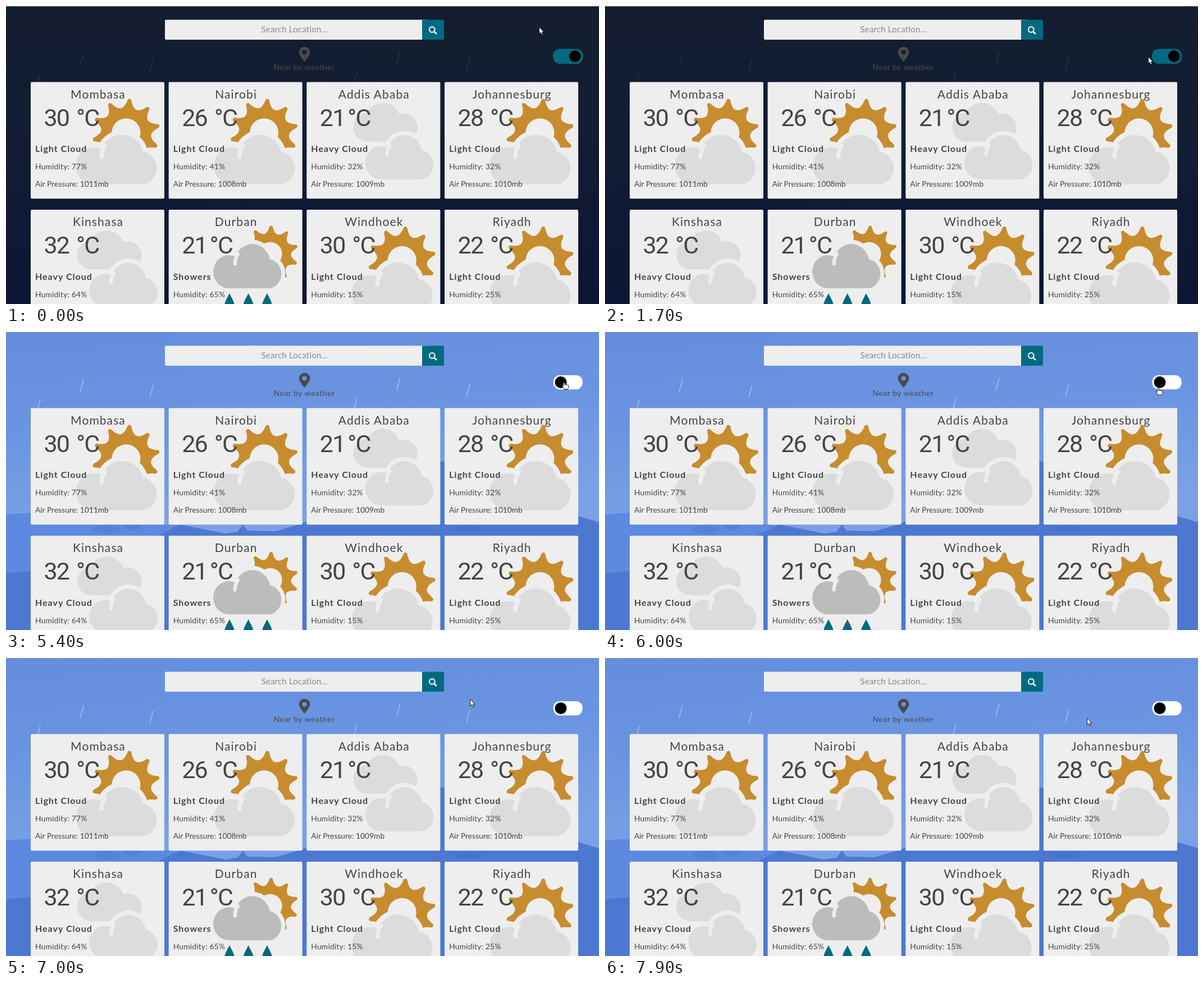
Write an HTML page that moves like this. It is 1056x531 px and loops after 8 s.

```html
<!DOCTYPE html>
<html lang="en">
<head>
<meta charset="utf-8">
<title>Weather</title>
<style>
html, body { margin: 0; width: 100%; height: 100%; overflow: hidden; background: #0d1634; }
svg { display: block; width: 1056px; height: 531px; }
text { font-family: Lato, "Open Sans", sans-serif; fill: #444; }
.title { font-size: 21px; letter-spacing: 1.1px; text-anchor: middle; }
.temp { font: 43px Roboto, "Open Sans", sans-serif; letter-spacing: -1.8px; }
.state { font-size: 16px; font-weight: 700; letter-spacing: 1px; }
.hum { font-size: 13.8px; letter-spacing: .2px; }
.air { font-size: 13.8px; }
.hint { font-size: 15px; letter-spacing: .2px; fill: #8a8a8a; }
.near { font-size: 14px; letter-spacing: .5px; fill: #4a4a4a; }

.night, .rain, .cursor, .arrow, .hand { animation: 8s step-end -4ms infinite; }
.night { animation-name: night; }
.rain { animation-name: rain; }
.cursor { animation-name: move; }
.arrow { animation-name: arrow; }
.hand { animation-name: hand; }
@keyframes night { 0% { opacity: 1 } 67.5%, 100% { opacity: 0 } }
@keyframes rain { 0% { opacity: .14 } 67.5%, 100% { opacity: .8 } }
@keyframes arrow { 0% { opacity: 1 } 28.75% { opacity: 0 } 77.5%, 100% { opacity: 1 } }
@keyframes hand { 0% { opacity: 0 } 28.75% { opacity: 1 } 77.5%, 100% { opacity: 0 } }
@keyframes move {
  0% { transform: translate(949px, 37px) }
  15% { transform: translate(950px, 40px) }
  16.25% { transform: translate(952px, 47px) }
  17.5% { transform: translate(954px, 56px) }
  18.75% { transform: translate(957px, 66px) }
  20% { transform: translate(961px, 78px) }
  21.25% { transform: translate(967px, 90px) }
  22.5% { transform: translate(978px, 107px) }
  23.75% { transform: translate(987px, 119px) }
  26.25% { transform: translate(987px, 117px) }
  27.5% { transform: translate(989px, 109px) }
  28.75% { transform: translate(988px, 98px) }
  30% { transform: translate(988px, 92px) }
  67.5% { transform: translate(990px, 89.5px) }
  75% { transform: translate(981px, 100px) }
  77.5% { transform: translate(955px, 112px) }
  78.75% { transform: translate(925px, 112px) }
  80% { transform: translate(899px, 110.5px) }
  81.25% { transform: translate(885px, 106px) }
  82.5% { transform: translate(874px, 100px) }
  85% { transform: translate(850px, 87px) }
  87.5% { transform: translate(826px, 73px) }
  90% { transform: translate(821px, 70px) }
  91.25% { transform: translate(819px, 71px) }
  93.75% { transform: translate(821px, 87px) }
  96.25% { transform: translate(838px, 104px) }
  98.75%, 100% { transform: translate(858px, 106.5px) }
}
</style>
</head>
<body>
<svg viewBox="0 0 1056 531">
  <defs>
    <linearGradient id="sky" x2=".15" y2="1">
      <stop offset="0" stop-color="#648edd"/>
      <stop offset=".35" stop-color="#6b95e1"/>
      <stop offset=".65" stop-color="#7aa1e5"/>
    </linearGradient>
    <linearGradient id="dusk" x2="0" y2="1">
      <stop offset="0" stop-color="#101826"/>
      <stop offset=".5" stop-color="#0d152a"/>
      <stop offset="1" stop-color="#0a112c"/>
    </linearGradient>
    <path id="cloud" d="M33 84A33 33 0 0 1 33 18Q41 18 47 21A38 38 0 0 1 120 26A29.5 29.5 0 0 1 120.5 84Z"/>
    <path id="notch" d="M46 35Q46 24 52 16" fill="none" stroke="#eee" stroke-width="7.5" stroke-linecap="round"/>
    <path id="drop" d="M0 0C3 7 9 15 9 23A9 9 0 0 1 -9 23C-9 15 -3 7 0 0Z" fill="#006a80"/>
    <g id="sun">
      <path id="rays" fill="#c78c2e" stroke="#c78c2e" stroke-width="7" stroke-linejoin="round"/>
      <circle r="25.5" fill="#eee"/>
    </g>
  </defs>

  <rect width="1056" height="531" fill="url(#sky)"/>
  <path d="M0 325L44 322L310 345L400 370V531H0Z" fill="#5d8ae0"/>
  <path d="M0 430L44 426L270 363L310 343L390 359L412 356L422 343L430 354L480 355L525 342L776 230L1019 328L1056 339V531H0Z" fill="#4c78d1"/>
  <g fill="#3a62b8" opacity=".2">
    <ellipse cx="180" cy="352" rx="24" ry="8"/>
    <ellipse cx="226" cy="347" rx="16" ry="6"/>
    <ellipse cx="822" cy="351" rx="26" ry="6"/>
  </g>
  <rect class="night" width="1056" height="531" fill="url(#dusk)" fill-opacity=".95"/>
  <path class="rain" stroke="#b4d2ec" stroke-width="1.3" d="M138 84l-6 23M262 94l-6 23M702 81l-6 23M826 92l-6 23M61 121l-6 23M625 118l-6 23M438 23l-6 23"/>
  <path d="M0 .5H1056" stroke="#8e9196"/>

  <rect x="283" y="24.5" width="470" height="35.5" rx="2" fill="#eee"/>
  <path d="M741 24.5h37q2 0 2 2v31.5q0 2-2 2h-37z" fill="#006a80"/>
  <g fill="none" stroke="#eee" stroke-width="2.3">
    <circle cx="758.8" cy="42" r="4.8"/>
    <path d="M762.3 45.5l4.6 4.6" stroke-width="2.8"/>
  </g>
  <text class="hint" x="454.5" y="47">Search Location...</text>
  <path transform="translate(521.8 72.7) scale(.0508)" fill="#4a4a4a" d="M172 502C27 291 0 269 0 192a192 192 0 0 1 384 0c0 77-27 99-172 310-10 13-30 13-40 0zM192 272a80 80 0 1 0 0-160 80 80 0 0 0 0 160z"/>
  <text class="near" x="476.5" y="114.3">Near by weather</text>

  <g>
    <rect x="974.7" y="77" width="52" height="25.3" rx="11.5" fill="#fff"/>
    <circle cx="988" cy="89.6" r="10.5"/>
  </g>
  <g class="night">
    <rect x="974.2" y="76.5" width="53" height="26.3" rx="12" fill="#006a80"/>
    <circle cx="1013.3" cy="89.6" r="10.5"/>
  </g>

  <g id="cards"></g>

  <g class="cursor" stroke="#111" stroke-linejoin="round" fill="#fff">
    <path class="arrow" d="M.5 .5V12.5L3.2 10L5 14.2L7.2 13.2L5.4 9.2H8.8Z"/>
    <path class="hand" d="M4 .5c-.9 0-1.3.6-1.3 1.3v5l-1-.9c-.9-.7-1.8.2-1.2 1.1l2.7 4c.5.8 1.2 1.3 2.2 1.3h3.5c1.8 0 2.6-1 2.8-2.6l.4-3.2c.2-1-.6-1.6-1.6-1.6l-5.2-.8V1.8c0-.7-.5-1.3-1.3-1.3z"/>
  </g>
</svg>
<script>
const cities = [
  ["Mombasa", 30, "Light Cloud", 77, 1011],
  ["Nairobi", 26, "Light Cloud", 41, 1008],
  ["Addis Ababa", 21, "Heavy Cloud", 32, 1009],
  ["Johannesburg", 28, "Light Cloud", 32, 1010],
  ["Kinshasa", 32, "Heavy Cloud", 64, 1010],
  ["Durban", 21, "Showers", 65, 1015],
  ["Windhoek", 30, "Light Cloud", 15, 1012],
  ["Riyadh", 22, "Light Cloud", 25, 1013]
];

const polar = (deg, r) => {
  const a = deg * Math.PI / 180;
  return `${(r * Math.cos(a)).toFixed(2)} ${(r * Math.sin(a)).toFixed(2)}`;
};

// Ten pointed rays joined by curved valleys
const tip = 24;
let star = "M" + polar(tip, 57);
for (let i = 1; i <= 10; i++) star += `Q${polar(tip - 18 + i * 36, 28)} ${polar(tip + i * 36, 57)}`;
document.getElementById("rays").setAttribute("d", star + "Z");

const use = (id, at, extra = "") => `<use href="#${id}" transform="translate(${at}) ${extra}"/>`;

// Cloud with a card-coloured gap around it
const cloud = (at, fill, size = "") => `<g transform="translate(${at}) ${size}" fill="${fill}">
  <use href="#cloud" stroke="#eee" stroke-width="17"/>
  <use href="#cloud"/><use href="#notch"/></g>`;

const small = "scale(.84 .893)";
const icons = {
  "Light Cloud": use("sun", "169.9 90.3") + cloud("80 98.3", "#dcdcdc"),
  "Heavy Cloud": `<path fill="#dcdcdc" d="M106 106.3A26 26 0 0 1 107.5 54.5A31.5 31.5 0 0 1 165 57.5A25 25 0 1 1 171 106.3Z"/>`
    + cloud("104.5 98.3", "#dcdcdc", small),
  "Showers": use("sun", "180.8 78.8", "rotate(-4) scale(.83)") + cloud("79.4 65", "#bcbcbc", small)
    + [108.3, 142, 175.3].map(x => use("drop", x + " 148.7")).join("")
};

const card = ([name, temp, state, hum, air], i) => {
  const x = 44 + i % 4 * 245.67, y = 135.5 + (i >> 2) * 227.5;
  const unit = temp % 10 === 1 ? 73 : 81; // a closing 1 is set narrow
  return `<g transform="translate(${x} ${y})">
    <rect width="238" height="207.7" rx="2" fill="#eee"/>
    ${icons[state]}
    <text class="title" x="120" y="29.2">${name}</text>
    <text class="temp" y="78.3"><tspan x="23.5">${temp}</tspan><tspan x="${unit}">°C</tspan></text>
    <text class="state" x="8" y="124.8">${state}</text>
    <text class="hum" x="8" y="155.5">Humidity: ${hum}%</text>
    <text class="air" x="8" y="186.5">Air Pressure: ${air}mb</text>
  </g>`;
};
document.getElementById("cards").innerHTML = cities.map(card).join("");
</script>
</body>
</html>
```
